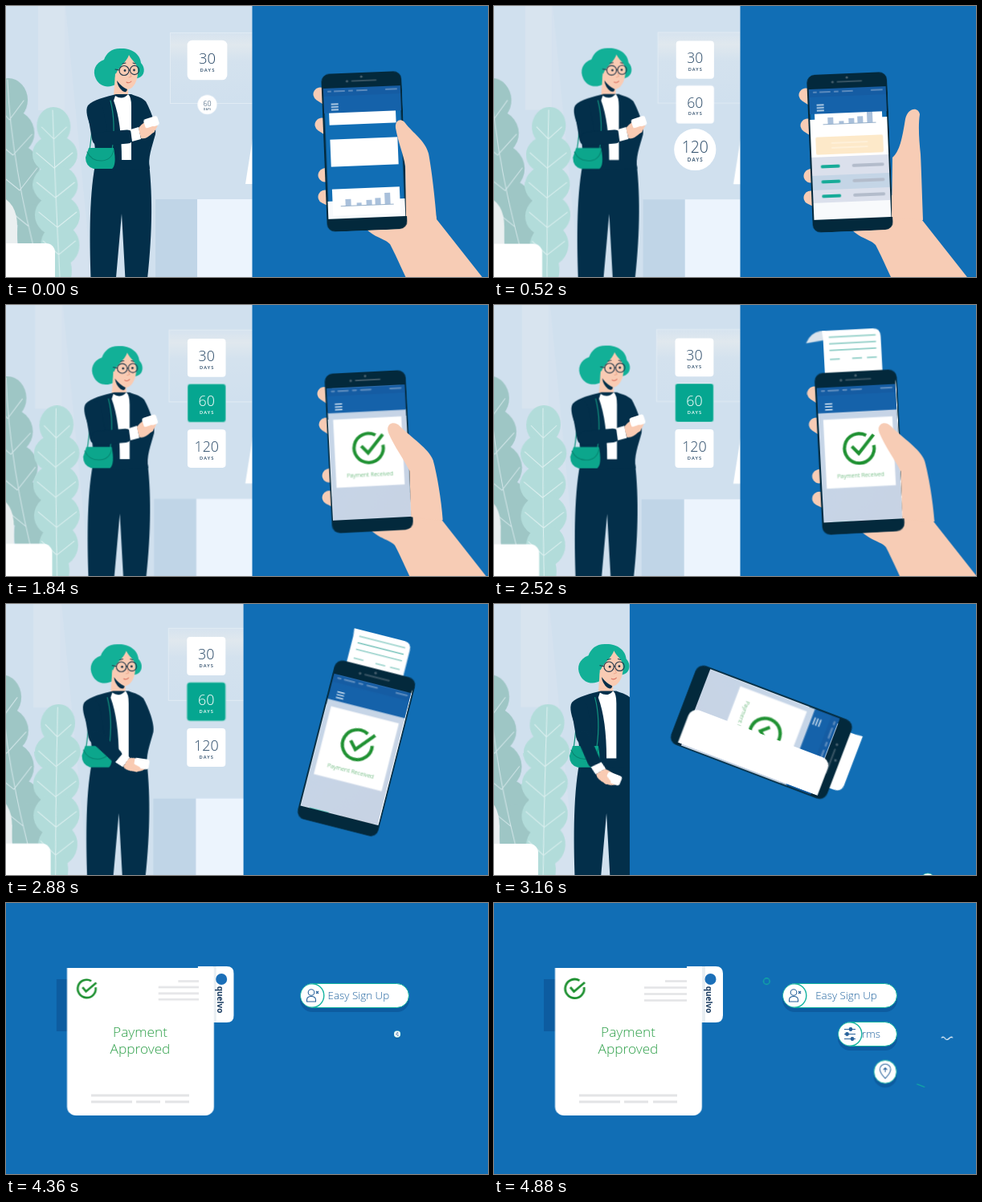
Write an HTML page that moves like this. It is 600 by 338 pixels and loops after 4920 ms.

```html
<!DOCTYPE html>
<html lang="en">
<head>
<meta charset="utf-8">
<title>Payment terms</title>
<style>
html, body { margin: 0; width: 100%; height: 100%; overflow: hidden; background: #116eb5; }
svg { display: block; }
#stage { position: absolute; left: 0; top: 0; width: 600px; height: 338px; overflow: hidden; font-family: "Open Sans", sans-serif; }
text { text-anchor: middle; }
.line { fill: none; stroke-linecap: round; stroke-linejoin: round; }
.light { font-weight: 300; }

/* every moving part shares one clock */
.a { animation: 4.92s ease-in-out infinite both; }

/* office */
#scene { animation-name: zoom; animation-timing-function: linear; transform-origin: 305px 175px; }
@keyframes zoom { 0% { transform: scale(1); } 73%, 100% { transform: scale(1.028); } }
.plant { animation-name: sway; transform-origin: 62px 338px; }
@keyframes sway {
  0% { transform: skewX(.8deg); } 10.6% { transform: skewX(-2.2deg); }
  25%, 51% { transform: skewX(-1.3deg); } 64%, 100% { transform: skewX(-3deg); }
}
#dark { animation-name: swayback; }
@keyframes swayback {
  0% { transform: skewX(.5deg); } 10.6% { transform: skewX(1.6deg); } 25% { transform: skewX(-1.2deg); }
  51% { transform: skewX(1.2deg); } 64%, 100% { transform: skewX(.8deg); }
}
#forearm { animation-name: lower; transform-origin: 116px 166px; }
@keyframes lower { 0%, 53.7% { transform: none; } 61.8%, 100% { transform: rotate(72deg) scale(.92); } }
#grip { animation-name: grip; transform-origin: 181px 145px; }
@keyframes grip { 0%, 53.7% { transform: rotate(-18deg); } 61.8%, 100% { transform: rotate(-50deg) scale(1.1); } }
.pop { animation-name: pop; animation-timing-function: linear; }
@keyframes pop {
  0%, 76%, 100% { transform: scale(0); } 1.63% { transform: scale(.51); }
  5.7% { transform: scale(1.106); } 8.1% { transform: scale(1.06); } 9.8%, 75% { transform: scale(1); }
}
.pop rect { fill: #fff; animation: square 4.92s linear infinite both; animation-delay: inherit; }
@keyframes square { 0%, 5.7% { rx: 23.5px; } 8.1% { rx: 6px; } 9.8%, 100% { rx: 4px; } }
.pop text { fill: #2a4a68; }
.pop .n { font-size: 17.5px; font-weight: 300; }
.pop .d { font-size: 5.6px; font-weight: 600; letter-spacing: 1.1px; }
#fill { animation-name: fill; animation-timing-function: linear; }
@keyframes fill { 0%, 22.8% { transform: scale(0); } 28.5%, 100% { transform: scale(1); } }
#chosen text { animation: white 4.92s linear infinite; }
@keyframes white { 0%, 22.8% { fill: #2a4a68; } 24.8%, 100% { fill: #fff; } }
#panel { animation-name: panel; }
@keyframes panel { 0%, 56.3% { transform: translateX(306.5px); } 73.2%, 100% { transform: none; } }

/* hand and phone */
.hold { animation-name: hold; transform-origin: 446px 181px; }
@keyframes hold {
  0% { transform: translate(0, 0) scale(1); } 10.6%, 14% { transform: translate(-3px, 1px) scale(1); }
  25.2% { transform: translate(3px, 1px) scale(1); } 51.2%, 55% { transform: translate(9px, 2px) scale(1.025); }
  75.6%, 100% { transform: translate(9px, 2px) scale(1); }
}
.exit { animation-name: exit; }
@keyframes exit { 0%, 53.7% { transform: none; } 60%, 100% { transform: translate(160px, 340px); } }
#thumb { animation-name: thumb; }
@keyframes thumb {
  0%, 2% { d: path("M498 262L497 200C495 185 488 170 485 152C484 142 492 139 497 146C506 158 522 168 526 184C530 205 534 240 536 266Z"); }
  8.5%, 15% { d: path("M498 262L499 188C508 180 511 165 515 140C518 126 531 124 533 134C531 148 532 165 534 184C535 205 536 240 537 266Z"); }
  23%, 100% { d: path("M498 262L496 205C490 192 477 175 470 158C466 146 478 143 484 150C498 164 520 178 525 192C530 210 535 240 537 266Z"); }
}
#fly { animation-name: fly; }
@keyframes fly {
  0% { transform: translate(446px, 181px) rotate(-2.3deg); }
  51.2%, 54.9% { transform: translate(446px, 181px) rotate(-3deg); }
  75.6%, 100% { transform: translate(158.5px, 127px) rotate(270deg); }
}
#body { animation-name: shrink; }
@keyframes shrink {
  0%, 54.9% { transform: none; opacity: 1; } 64.2% { transform: scale(1.04); opacity: 1; }
  77.2% { transform: scale(.94); opacity: 1; } 79%, 100% { transform: scale(.9); opacity: 0; }
}
.scroll { animation-name: scroll; }
@keyframes scroll { 0%, 1.5% { transform: none; } 9%, 100% { transform: translateY(-103px); } }
#top { animation-name: up; }
@keyframes up { 0%, 15.5% { transform: none; } 22%, 100% { transform: translateY(-46px); } }
#rows { animation-name: down; }
@keyframes down { 0%, 15.5% { transform: none; } 22%, 100% { transform: translateY(48px); } }
.ring { animation-name: ring; }
@keyframes ring {
  0%, 22.8% { stroke-dasharray: 0 44 0 100; } 25.2% { stroke-dasharray: 0 34 21 100; }
  33.3%, 100% { stroke-dasharray: 0 0 101 100; }
}
.tick { animation-name: tick; }
@keyframes tick {
  0%, 22.8% { stroke-dasharray: 0 36 0 100; } 25.2% { stroke-dasharray: 0 29 18 100; }
  33.3%, 100% { stroke-dasharray: 0 0 101 100; }
}
.paid { animation-name: paid; }
@keyframes paid { 0%, 33.3% { opacity: 0; } 37.4%, 100% { opacity: 1; } }
#receipt { animation-name: print; }
@keyframes print {
  0%, 38.2% { transform: translateY(56px); } 50.4%, 55.3% { transform: none; }
  64.2% { transform: translateY(36px); } 67%, 100% { transform: translateY(56px); }
}
#curl { animation-name: curl; transform-origin: -36px -143px; }
@keyframes curl { 0%, 42% { transform: scaleX(0); } 49%, 55.3% { transform: none; } 59%, 100% { transform: scaleX(0); } }
#ink { animation-name: ink; }
@keyframes ink { 0%, 57% { opacity: 1; } 63%, 100% { opacity: 0; } }

/* approval sheet */
#sheet { animation-name: grow; }
@keyframes grow {
  0%, 59% { transform: none; } 64.2% { transform: translateX(-46px); }
  77.2% { transform: translateX(-170px); } 83.7%, 100% { transform: translateX(-184px); }
}
.word { animation-name: word; }
@keyframes word {
  0%, 74% { transform: translateY(var(--y)); opacity: 0; } 77.2% { transform: translateY(var(--y)); opacity: 1; }
  87%, 100% { transform: none; opacity: 1; }
}
#foot { animation-name: foot; }
@keyframes foot { 0%, 77.2% { transform: translateY(-13px); } 83.7%, 100% { transform: none; } }
.wipe { animation-name: wipe; transform-origin: 106px 0; }
@keyframes wipe { 0%, 75% { transform: scaleX(0); } 77.2% { transform: scaleX(var(--s)); } 84.5%, 100% { transform: none; } }
.late { animation-name: late; }
@keyframes late { 0%, 84.6% { transform: scale(0); } 89.4%, 100% { transform: scale(1); } }
.side { animation-name: side; }
@keyframes side { 0%, 80.4% { transform: translateX(var(--x)); opacity: 0; } 80.8% { transform: translateX(var(--x)); opacity: 1; } 90%, 100% { transform: none; opacity: 1; } }

/* benefits */
.pill {
  position: absolute; right: 98px; width: 30px; height: 31px; box-sizing: border-box; overflow: hidden;
  border: 1.5px solid #14b3a0; border-radius: 16px; background: #fff; box-shadow: 0 5px 0 #0d5ca0;
  transform-origin: calc(100% - 15px) 50%;
}
.pill span { position: absolute; right: -1px; width: 127px; top: 4px; text-align: center; white-space: nowrap; font: 300 13.4px/20px "Open Sans", sans-serif; color: #20639f; }
.pill svg { position: absolute; left: -1.5px; top: -1.5px; fill: none; stroke: #28639c; stroke-width: 1.1; }
.pill .disc { fill: #fff; stroke: #14b3a0; stroke-width: 1.4; }
.pill .dot { fill: #28639c; }
#p1 { top: 99.5px; animation-name: rise, open1; }
@keyframes rise {
  0%, 62% { transform: translate(58px, 262px) scale(.65); } 64.2% { transform: translate(53px, 230px) scale(.65); }
  75.6% { transform: translate(2px, 4px) scale(.68); } 77.2% { transform: translate(-1px, 0) scale(.68); } 81%, 100% { transform: none; }
}
@keyframes open1 { 0%, 82% { width: 30px; } 90%, 100% { width: 143px; } }
#p2 { top: 147.5px; animation-name: pop2, open2; }
@keyframes pop2 { 0%, 87% { transform: scale(0); } 91.5%, 100% { transform: none; } }
@keyframes open2 { 0%, 95.5% { width: 30px; } 99.2% { width: 74px; } 100% { width: 86px; } }
#p3 { top: 195px; animation-name: pop3; }
@keyframes pop3 { 0%, 95% { transform: scale(0); } 99.2%, 100% { transform: scale(.96); } }
.bit { animation-name: bit; }
@keyframes bit {
  0%, 89% { transform: translate(var(--x), var(--y)); opacity: 0; } 90% { opacity: 1; }
  94% { transform: translate(calc(var(--x) * .3), calc(var(--y) * .3)); } 100% { transform: none; opacity: 1; }
}
#cross { animation-name: cross; }
@keyframes cross {
  0%, 75% { transform: translate(-12px, 0); opacity: 0; } 76% { transform: translate(-8px, 0); opacity: 1; }
  77.2% { transform: none; opacity: 1; } 81% { transform: translate(14px, -2px); opacity: 1; } 82%, 100% { transform: translate(17px, -2px); opacity: 0; }
}
</style>
</head>
<body>
<div id="stage">
<svg width="600" height="338" viewBox="0 0 600 338">
  <defs>
    <linearGradient id="glass" x2="0" y2="1"><stop offset="0" stop-color="#d6e3ef"/><stop offset=".17" stop-color="#e0e8ee"/><stop offset=".4" stop-color="#d4e2ee"/><stop offset="1" stop-color="#d0e0ee"/></linearGradient>
    <linearGradient id="dim" x2="1" y2="1"><stop offset="0" stop-color="#c6d6e8"/><stop offset="1" stop-color="#c8d3e4"/></linearGradient>
    <clipPath id="tile"><rect x="-23.5" y="-23.5" width="47" height="47" rx="4"/></clipPath>
    <clipPath id="screen"><rect x="-47.5" y="-80" width="95" height="163"/></clipPath>
    <clipPath id="edge"><rect x="-300" y="-120" width="348" height="240"/></clipPath>
  </defs>

  <g id="scene" class="a">
    <rect x="-10" y="-10" width="340" height="360" fill="#d0e0ee"/>
    <path d="M40-10H73V130H40Z" fill="#d8e4ef"/>
    <path d="M73-10L107 338H60V130H73Z" fill="#d5e2ef"/>
    <path d="M204.500 33.500H320V121.500H204.500Z" fill="url(#glass)" stroke="#e1ebf4"/>
    <path d="M186 241H238V350H186Z" fill="#c0d5e7"/>
    <path d="M238 241H320V350H238Z" fill="#ecf4fd"/>
    <path d="M298 222L307 165H320V222Z" fill="#fff"/>

    <g id="dark" class="plant a" fill="#9ec6c5">
      <ellipse cx="5" cy="117" rx="24" ry="27"/><ellipse cx="7" cy="158" rx="30" ry="29"/>
      <ellipse cx="10" cy="202" rx="33" ry="31"/><ellipse cx="24" cy="246" rx="28" ry="29"/><ellipse cx="35" cy="285" rx="21" ry="38"/>
      <path class="line" stroke="#d3e6e9" d="M4 92Q8 200 42 330M6 142l-14-16M6 142l18-24M10 186l-24-20M10 186l24-26M18 230l-22-18M18 230l22-28M29 275l-22-18"/>
    </g>
    <g class="plant a" fill="#b2dcda">
      <ellipse cx="62" cy="150" rx="21" ry="24"/><ellipse cx="63" cy="185" rx="28" ry="24"/><ellipse cx="63" cy="223" rx="28" ry="25"/>
      <ellipse cx="65" cy="261" rx="28" ry="26"/><ellipse cx="68" cy="298" rx="24" ry="26"/><ellipse cx="68" cy="330" rx="14" ry="24"/>
      <path class="line" stroke="#ddf0f0" d="M61 130Q63 240 67 338M62 166l-15-15M62 166l16-15M62 202l-22-19M62 202l23-19M63 239l-23-19M63 239l24-19M65 276l-23-19M65 276l24-19M66 310l-19-17M66 310l21-17"/>
    </g>
    <path d="M-10 236Q14 244 14 275V310H-10Z" fill="#eaeff0"/>
    <rect x="-20" y="296" width="81" height="60" rx="11" fill="#fff"/>

    <g id="woman">
      <path d="M142 53C131 53 125 59 122 67C111 71 107 81 112 91C117 101 128 103 138 97L164 90C173 88 174 77 168 71C167 59 155 52 142 53Z" fill="#12b097"/>
      <path d="M136 84L152 96V112Q145 120 134 113Z" fill="#f9cbb3"/>
      <path d="M136 92C135 78 149 73 153 61C157 69 163 71 164 79C165 92 159 104 151 104C144 104 138 100 136 92Z" fill="#f9cbb3"/>
      <path d="M138 93Q144 101 151 104Q150 109 145 106Q139 101 138 93Z" fill="#032f4a"/>
      <g class="line" stroke="#25384a"><circle cx="147" cy="80.500" r="6" stroke-width="1.100"/><circle cx="160" cy="80" r="5.600" stroke-width="1.100"/>
        <path d="M153 80h1.500M141 80l-5-1M145 72l4-1M158 71l3 1" stroke-width="1"/><path d="M154 83l2 5-3 1" stroke="#eda98f"/><path d="M150 95q3 2 6-1" stroke="#d9705f"/></g>
      <circle cx="148" cy="80.500" r="1.400" fill="#25384a"/><circle cx="159.500" cy="80" r="1.400" fill="#25384a"/>
      <path d="M111 198L178 196C183 240 182 290 175 350H149L144 259L136 350H106C104 300 103 240 111 198Z" fill="#032f4a"/>
      <path d="M137 110C125 113 108 117 102 124C98 130 102 142 106 152C110 164 112 178 111 205L179 203C176 190 182 175 186 160C188 150 180 130 174 119C168 113 160 112 156 110Z" fill="#032f4a"/>
      <path d="M136 112Q145 118 152 110Q156 113 156 125V192H144Q144 145 134 118Z" fill="#fff"/>
      <path class="line" d="M104 180Q109 145 107 126M132 180Q137 145 130 118" stroke="#12917f" stroke-width="1.200"/>
      <path d="M103 177H134Q138 198 132 203H109Q99 200 99 189Z" fill="#0ca68c"/>
      <path class="line" d="M101 182Q106 193 118 193Q131 193 134 180" stroke="#078571"/>
      <path class="line" d="M111 130L117 165" stroke="#032f4a" stroke-width="20"/>
      <g id="forearm" class="a">
        <path class="line" d="M117 166L151 163" stroke="#032f4a" stroke-width="17"/>
        <path d="M155 154L165 151L168 166L157 169Z" fill="#fff"/>
        <path d="M165 152Q172 143 180 143L189 144Q190 151 183 158Q174 167 168 165Z" fill="#f9cbb3"/>
        <rect id="grip" class="a" x="172" y="139" width="18" height="12" rx="3" fill="#fff"/>
        <path class="line" d="M168 157L183 152M171 161L183 156" stroke="#f9cbb3" stroke-width="4"/>
      </g>
    </g>

    <g transform="translate(250.500 67.500)"><g class="pop a" style="animation-delay:-.4s"><rect x="-23.500" y="-23.500" width="47" height="47"/><text class="n" y="4">30</text><text class="d" x=".5" y="13.500">DAYS</text></g></g>
    <g transform="translate(250.500 123)"><g id="chosen" class="pop a" style="animation-delay:-.08s"><rect x="-23.500" y="-23.500" width="47" height="47"/>
      <g clip-path="url(#tile)"><circle id="fill" class="a" r="46" fill="#05a690"/></g><text class="n" y="4">60</text><text class="d" x=".5" y="13.500">DAYS</text></g></g>
    <g transform="translate(250.500 179)"><g class="pop a" style="animation-delay:.24s"><rect x="-23.500" y="-23.500" width="47" height="47"/><text class="n" y="4">120</text><text class="d" x=".5" y="13.500">DAYS</text></g></g>
  </g>

  <rect id="panel" class="a" width="620" height="338" fill="#116eb5"/>

  <g class="hold a"><g class="exit a">
    <path d="M436 262C452 290 470 288 478 297C486 312 498 340 508 360H610L536 266L530 235H480Z" fill="#f7ccb5"/>
    <path class="line" d="M391 110l14 9M393 148l14 9M397 211l10-3M397 238l8 4" stroke="#f7ccb5" stroke-width="17"/>
  </g></g>

  <g class="side a" style="--x:20px"><path d="M62 95H90V160H62Z" fill="#0d5ca0"/></g>
  <g class="side a" style="--x:-30px">
    <path d="M240 79H276Q285 79 285 88V140Q285 149 276 149H240Z" fill="#fff"/><path d="M259 79h4v70h-4Z" fill="#e8eef2"/>
    <circle cx="269.500" cy="95" r="7" fill="#1b6fb8"/>
    <text transform="translate(264 120.500) rotate(90)" font-size="10" font-weight="700" fill="#16395f">quelvo</text>
  </g>

  <g class="hold a"><g id="fly" class="a">
    <g id="body" class="a">
      <g id="receipt" class="a">
        <path id="curl" class="a" d="M-34-149H-40Q-52-148-58-135L-34-138Z" fill="#d9e3ec"/>
        <path d="M-38-149H24Q33-149 33-139V-90H-37V-139Z" fill="#fff"/>
        <path id="ink" class="a" d="M-30-141H27M-30-133H27M-30-125H27M-30-114h12M-3-114h12M15-114h12" stroke="#3ba99c" fill="none"/>
      </g>
      <rect x="-50" y="-98" width="100" height="197" rx="10" fill="#03293c"/>
      <path class="line" d="M-12-88H18" stroke="#47606f" stroke-width="1.600"/><circle cx="-18" cy="-88" r="1.600" fill="#47606f"/><circle cx="0" cy="-93" r="1.600" fill="#47606f"/>
      <g clip-path="url(#screen)">
        <path d="M-48-80H48V84H-48Z" fill="#116eb5"/>
        <g class="scroll a">
          <path d="M-48 61H48V300H-48Z" fill="#fff"/>
          <g id="rows" class="a">
            <path d="M-48 108H48V131H-48Z" fill="#dbe0ec"/><path d="M-48 131H48V149H-48Z" fill="#c4d5e6"/><path d="M-48 149H48V168H-48Z" fill="#dbe0ec"/>
            <path class="line" d="M-35 120h20M-35 139h20M-35 157h20" stroke="#17ab98" stroke-width="4"/>
            <path class="line" d="M4 120h36M4 139h36M4 157h36" stroke="#b3bccb" stroke-width="4"/>
          </g>
        </g>
        <path d="M-48 62H48V84H-48Z" fill="#f8fafc"/>
        <g class="scroll a"><g id="top" class="a">
          <path d="M-42-52H41V-34H-42ZM-42-16H42V18H-42ZM-42 46H42V79H-42Z" fill="#fff"/>
          <path d="M-26 67v-8h7v8ZM-12 67v-3h6v3ZM0 67v-6h7v6ZM11 67v-8h7v8ZM23 67v-14h7v14Z" fill="#a9c0db"/>
          <path d="M-32 67.500H34" stroke="#7c9cbd" stroke-width=".8"/>
          <rect x="-42" y="83" width="84" height="22" rx="2" fill="#fde9c9"/>
          <path class="line" d="M-22 91h44M-22 97h44" stroke="#fff4df" stroke-width="1.500"/>
        </g></g>
        <g class="paid a"><path d="M-48-50H48V84H-48Z" fill="url(#dim)"/><path d="M-42-41H42V43H-42Z" fill="#fff"/>
          <text class="light" y="31" font-size="7" fill="#2b9b45">Payment Received</text></g>
        <g transform="translate(0 -4)" fill="none" stroke="#1f9132" stroke-width="4">
          <path class="ring a" pathLength="100" d="M9-15.600A18 18 0 1 0 17.700-3.100"/>
          <path class="tick a" pathLength="100" d="M-9-3L-1 6L18-16"/>
        </g>
        <path d="M-48-81H48V-49H-48Z" fill="#1562aa"/><path d="M-48-81H48V-70H-48Z" fill="#155ca3"/>
        <path class="line" d="M-42-76h3M-34-76h12M-16-76h4M-6-76h12M30-76h13" stroke="#5a8abd" stroke-width="2.200"/>
        <path d="M-39-60h9M-39-56.500h9M-39-53h9" stroke="#d9e7f4" stroke-width="1.400"/>
      </g>
    </g>
    <g clip-path="url(#edge)"><rect id="sheet" class="a" x="48" y="-91.500" width="220" height="183" rx="11" fill="#fff"/></g>
  </g></g>

  <g class="hold a"><g class="exit a"><path id="thumb" class="a" fill="#f7ccb5" d="M498 262L497 200C495 185 488 170 485 152C484 142 492 139 497 146C506 158 522 168 526 184C530 205 534 240 536 266Z"/></g></g>

  <g class="light" font-size="17.300" fill="#2fa04a">
    <text class="word a" x="167" y="167" style="--y:-50px">Payment</text>
    <text class="word a" x="167" y="188" style="--y:-28px">Approved</text>
  </g>
  <g id="foot" class="a" fill="none" stroke="#e3e4e6" stroke-width="3">
    <path class="wipe a" style="--s:.29" d="M106 240H228"/>
    <path class="wipe a" style="--s:.07" d="M106 248h51M162 248h30M198 248h30"/>
  </g>
  <g transform="translate(240 97)"><path class="late a" d="M-27 .5H0M-53 8.500H0M-53 16.500H0M-53 24.500H0" stroke="#e3e4e6" stroke-width="2.600"/></g>
  <g transform="translate(100.500 107)"><path class="late a" d="M5.900-10.300A11.800 11.800 0 1 0 11.600-2M-5.500-2L-1 3.500L12.500-8" fill="none" stroke="#1f9132" stroke-width="2.800"/></g>

  <g class="line" stroke-width="1.200">
    <circle class="bit a" cx="339" cy="97.500" r="3.800" stroke="#14b3a0" style="--x:30px;--y:12px"/>
    <path class="bit a" d="M558 168q2-2 4 1t5 0t4-1" stroke="#fff" style="--x:-50px;--y:-8px"/>
    <path class="bit a" d="M527 226l9 3.500" stroke="#14b3a0" style="--x:-30px;--y:-14px"/>
    <path id="cross" class="a" d="M496.500 114l4 4m0-4l-4 4" stroke="#fff"/>
  </g>
</svg>

<div id="p1" class="pill a"><span>Easy Sign Up</span><svg width="31" height="31"><circle class="disc" cx="15" cy="15.500" r="14.800"/><circle cx="14" cy="11.500" r="3.800"/><path d="M8.500 23v-2q0-4.500 5.500-4.500t5.500 4.500v2ZM20 10l3 3m0-3l-3 3"/></svg></div>
<div id="p2" class="pill a"><span>Flexible Terms</span><svg width="31" height="31"><circle class="disc" cx="15" cy="15.500" r="14.800"/><path d="M8 9.500h14M8 15.500h14M8 21.500h14"/><circle class="dot" cx="16" cy="9.500" r="1.900"/><circle class="dot" cx="11.500" cy="15.500" r="1.900"/><circle class="dot" cx="18" cy="21.500" r="1.900"/></svg></div>
<div id="p3" class="pill a"><svg width="31" height="31"><path d="M15 24Q8 17 8 12.500a7 7 0 0 1 14 0Q22 17 15 24ZM15 16v-5.500m-2.500 2.300l2.500-2.500l2.500 2.500"/></svg></div>
</div>
</body>
</html>
```
